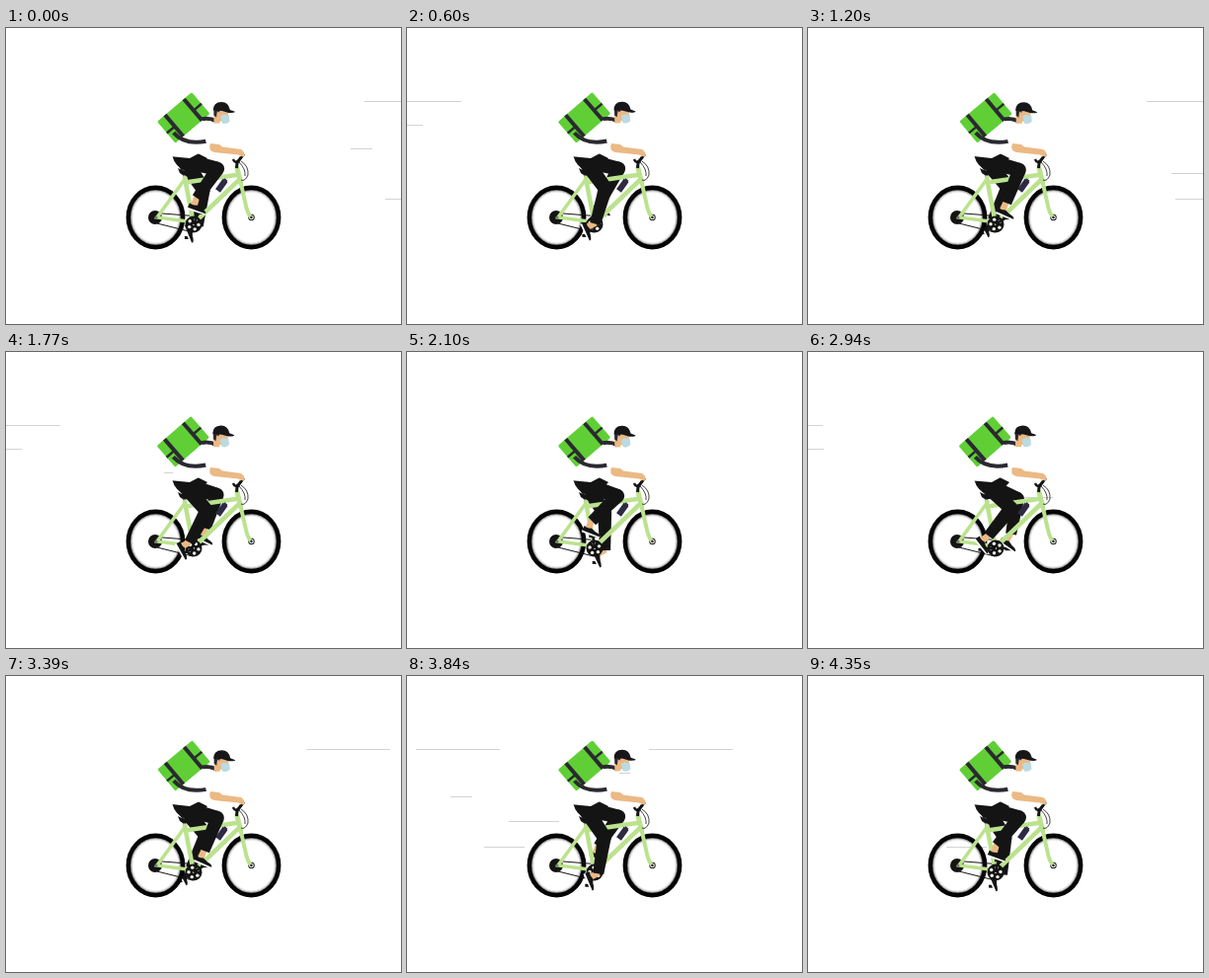
An HTML page with a canvas for the animation above (4.38 s loop, 400 px wide and 300 px high).

```html
<!DOCTYPE html>
<html lang="en">
<head>
<meta charset="utf-8">
<title>Courier on a bicycle</title>
<style>
html, body { margin: 0; width: 100%; height: 100%; overflow: hidden; background: #fff; }
canvas { display: block; width: 400px; height: 300px; }
</style>
</head>
<body>
<canvas id="stage" width="400" height="300"></canvas>
<script>
const c = document.getElementById('stage').getContext('2d');
const LOOP = 4380, STEP = 30, TURN = LOOP / 4;
const BLACK = '#141414', DARK = '#2b2930', SKIN = '#ebb984', FRAME = '#bbe28e';
const CRANK = [190, 199], REACH = 13.5, HIP = [181, 135], THIGH = 34, SHIN = 40;

// Speed lines: height, width, px per ms, times at which each enters on the right
const STREAKS = [
  [74, 85, .655, [-57, 1113, 2223, 3243, 3603]],
  [98, 55, .78, [37, 1207, 2319, 2377, 3547]],
  [122, 22, .8, [-64, 1470, 2226, 3395]],
  [147, 51, .8, [5, 1160, 2293, 2686, 3469]],
  [173, 41, .8, [-20, 1165, 2266, 3438, 4025]]
];

function poly(color, ...p) {
  c.fillStyle = color;
  c.beginPath();
  for (let i = 0; i < p.length; i += 2) c.lineTo(p[i], p[i + 1]);
  c.closePath();
  c.fill();
}

function shape(color, d) {
  c.fillStyle = color;
  c.fill(new Path2D(d));
}

function stroke(color, width, d) {
  c.strokeStyle = color;
  c.lineWidth = width;
  c.stroke(new Path2D(d));
}

function dot(color, x, y, r) {
  c.fillStyle = color;
  c.beginPath();
  c.arc(x, y, r, 0, 7);
  c.fill();
}

function ring(color, x, y, rx, ry, width) {
  c.strokeStyle = color;
  c.lineWidth = width;
  c.beginPath();
  c.ellipse(x, y, rx, ry, 0, 0, 7);
  c.stroke();
}

function limb([ax, ay], [bx, by], wa, wb) {
  const d = Math.hypot(bx - ax, by - ay), nx = (ay - by) / d, ny = (bx - ax) / d;
  poly(BLACK, ax + nx * wa, ay + ny * wa, bx + nx * wb, by + ny * wb,
    bx - nx * wb, by - ny * wb, ax - nx * wa, ay - ny * wa);
}

function streaks(t) {
  c.fillStyle = '#d3d3d3';
  for (const [y, w, v, starts] of STREAKS)
    for (const s of starts) if (t >= s) c.fillRect(Math.round(400 - (t - s) * v), y, w, 1);
}

// Crank angle a runs clockwise from the top
function pedalAt(a) {
  return [CRANK[0] + REACH * Math.sin(a), CRANK[1] - REACH * Math.cos(a)];
}

function leg(a) {
  const [px, py] = pedalAt(a);
  const tilt = (42 + 24 * Math.cos(a - 3.5)) * Math.PI / 180;
  const cos = Math.cos(tilt), sin = Math.sin(tilt);
  const place = (x, y) => [px + x * cos - y * sin, py + x * sin + y * cos];
  const ankle = place(-6, -9), cuff = place(-6, -13);

  // Knee from the two bone lengths, bent forwards
  const dx = ankle[0] - HIP[0], dy = ankle[1] - HIP[1], d = Math.hypot(dx, dy);
  const along = (THIGH ** 2 - SHIN ** 2 + d * d) / (2 * d);
  const out = Math.sqrt(Math.max(0, THIGH ** 2 - along ** 2));
  const knee = [HIP[0] + (dx * along + dy * out) / d, HIP[1] + (dy * along - dx * out) / d];

  c.save();
  c.translate(px, py);
  c.rotate(tilt);
  shape(SKIN, 'M-9.500-14H-3.500L-3-4H-10Z');
  shape('#fff', 'M-12-2H7Q8 1 5 1H-12Z');
  shape(BLACK, 'M-11.500-6Q-8-4-4-6L1-4Q8-3 7-.5L-12-1Z');
  c.restore();
  limb(HIP, knee, 8, 7);
  dot(BLACK, ...knee, 7);
  limb(knee, cuff, 7, 5.500);
}

function crankArm(a) {
  const [x, y] = pedalAt(a);
  stroke(BLACK, 2.500, `M${CRANK}L${x} ${y}`);
  stroke(BLACK, 3, `M${x - 4} ${y + 1}h8`);
}

function wheel(x) {
  ring('#e6e6e6', x, 192, 24, 26.500, 2);
  ring('#a5a5a5', x, 192, 25, 27.500, 1.500);
  ring('#050505', x, 192, 27.600, 30.100, 4.600);
}

function bike(a) {
  wheel(151.5);
  wheel(248.5);
  stroke(BLACK, 1, 'M152 187.500L190 190.500M153 198L189 207');
  dot(BLACK, 151, 192, 7);
  c.lineCap = 'round';
  stroke('#777', 3, 'M179.500 145L181 152');
  stroke(FRAME, 3.500, 'M182 152L153 192L188 196.500');
  stroke(FRAME, 4.500, 'M181 152L189.500 196M185 156L233 149M191 197L237 153');
  stroke(FRAME, 5, 'M234 142L237.500 156');
  dot(BLACK, 248.5, 192, 3.200);
  dot('#fff', 248.5, 192, 2.300);
  stroke(FRAME, 4, 'M237.500 156L242.500 178Q244 186 247 190.500');
  c.lineCap = 'butt';
  dot('#777', 152, 192, 1.500);
  dot(BLACK, 248.5, 192, 1.200);
  shape(BLACK, 'M174 142Q180 146 187 145L184 149Q179 150 176 147Z');
  stroke('#2d2a43', 6, 'M222 154.500L214.500 165');
  stroke('#2d2a43', 3, 'M220.500 153.500L223.500 156');
  stroke(BLACK, 3, 'M233.500 142L234 137L238 131');
  stroke(BLACK, 2.500, 'M230 133Q232 138 236 134L241 128');
  stroke(BLACK, .8, 'M238 135Q246 140 245 149Q242 156 238 154M236 136Q243 143 242 150');

  dot(BLACK, ...CRANK, 8.500);
  for (let i = 0; i < 5; i++) {
    const b = a + i * Math.PI * .4;
    dot('#f4f8ec', CRANK[0] + 5 * Math.sin(b), CRANK[1] - 5 * Math.cos(b), 1.700);
  }
  dot('#ddd', ...CRANK, 1);
  crankArm(a);
}

function bag() {
  c.save();
  c.translate(153.5, 94.5);
  c.rotate(-.69);
  c.fillStyle = '#60cf36';
  c.beginPath();
  c.roundRect(0, 0, 46, 28.500, 1.500);
  c.fill();
  c.fillStyle = DARK;
  c.fillRect(8.500, 0, 4, 28.500);
  c.fillRect(33.500, 0, 4, 28.500);
  c.fillRect(0, 14, 9, 2.500);
  c.fillRect(37, 14, 9, 2.500);
  c.restore();
}

function head() {
  shape(SKIN, 'M211 88L218 88L217 97L211 97Z');
  shape(SKIN, 'M213 83H225L226 91L222 96L215 94Z');
  shape(DARK, 'M211 82H218L216.500 86L214.500 85L213.500 91L211 89Z');
  shape('#bcdae2', 'M217.500 90L221 88L226.500 89L227 95Q224 98.500 219.500 97Z');
  shape('#17171a', 'M210.500 84Q210.500 75.500 219 75.500Q226 75.500 227.500 83.500L232.500 85.500Q232 87 226 86.500Q218 83.500 210.500 84Z');
}

function upperBody(sway) {
  c.save();
  c.translate(182, 130);
  c.rotate(sway * Math.PI / 180);
  c.translate(-182, -130);
  shape('#fff', 'M170 119L192 90L206 89L215 96L217 109L207 123L196 127L186 132L168 130Z');
  bag();
  stroke(DARK, 4, 'M170 106Q181 119 203 115');
  stroke(DARK, 4, 'M199 92.500Q207 91 214 95');
  shape('#fff', 'M198 96Q206 92 212 98L216 109L210 118L203 117L201 106Z');
  head();
  c.restore();
  shape(SKIN, 'M207 117L216 118L219 120.500L238 123Q243 126 241 131L235 128.500L211 126Q204 124 207 117Z');
}

function draw(t) {
  const turn = t / TURN * 2 * Math.PI, a = turn + .39;
  c.fillStyle = '#fff';
  c.fillRect(0, 0, 400, 300);
  streaks(t);
  crankArm(a + Math.PI);
  leg(a + Math.PI);
  bike(a);
  shape(BLACK, 'M168.500 130L194 127L204 132L192 145L181 144Q171 140 168.500 130Z');
  leg(a);
  upperBody(-.9 + .7 * Math.cos(turn - 1.4));
}

function tick() {
  const t = performance.now() % LOOP;
  draw(Math.floor(t / STEP) * STEP);
  requestAnimationFrame(tick);
}
tick();
</script>
</body>
</html>
```
